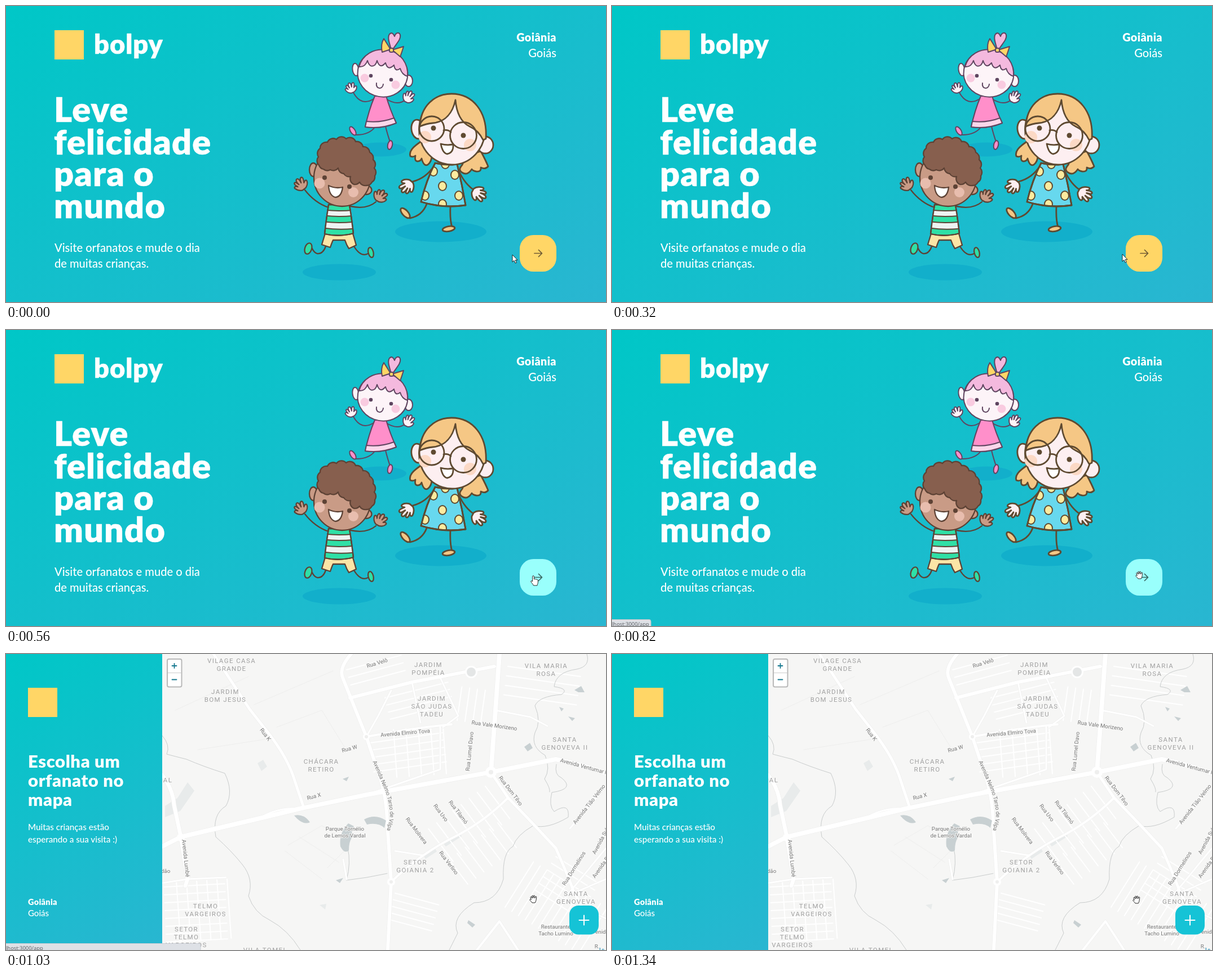
An HTML page that plays this animation: 1064x526 px, repeating every 2.23 s.

```html
<!DOCTYPE html>
<html lang="pt-BR">
<head>
<meta charset="utf-8">
<title>Orfanatos</title>
<style>
html, body { margin: 0; width: 100%; height: 100%; overflow: hidden; }
body { position: relative; background: #14bdd0; }
.layer { position: absolute; left: 0; top: 0; width: 1064px; height: 526px; }
.teal { background: linear-gradient(329.54deg, #29b6d1 0%, #00c7c7 100%); }
#map { background: #ddd; opacity: 0; }
#side { position: absolute; left: 0; top: 0; width: 277px; height: 526px; }
svg { display: block; position: absolute; left: 0; top: 0; }
text { font-family: Lato, sans-serif; fill: #fff; font-weight: 500; }
.black { font-weight: 900; letter-spacing: .02em; }
.round { stroke: #fff; stroke-width: .6; stroke-linejoin: round; }
.line { fill: none; stroke-linecap: round; stroke-linejoin: round; }
.kid { stroke-linecap: round; stroke-linejoin: round; }
.kid .limb, .kid .bare { fill: none; }
.kid .flat { stroke: none; }
#areas text { font: 400 11.5px Roboto, sans-serif; letter-spacing: 1.4px; fill: #a0a0a0; text-anchor: middle; }
#streets text { font: 400 9.8px Roboto, sans-serif; fill: #777; stroke: #f8f8f7; stroke-width: 2px; paint-order: stroke; text-anchor: middle; }
#status text { font: 400 9.4px "Open Sans", sans-serif; fill: #55595e; }
</style>
</head>
<body>
<div id="home" class="layer teal">
<svg width="1064" height="526" viewBox="0 0 1064 526">
  <defs>
    <path id="hand" vector-effect="non-scaling-stroke" d="M-4 10C-9 8-12 3-13-1C-13-4-9-4-7 0C-10-6-9-10-6-9C-4-8-4-4-3-2C-4-8-3-12 0-12C3-12 3-7 2-2C4-8 6-11 9-9C11-7 8-3 6 1C10-2 13-1 12 2C11 6 6 9 3 10Z"/>
    <path id="dress" d="M761 279Q780 284 800 281Q809 318 815 354Q775 360 736 348Q745 310 761 279Z"/>
    <clipPath id="inDress"><use href="#dress"/></clipPath>
    <path id="shirt" d="M572 353H609Q613 378 616 404Q590 411 565 405Q568 378 572 353Z"/>
    <clipPath id="inShirt"><use href="#shirt"/></clipPath>
  </defs>

  <rect x="86" y="43" width="52" height="52" fill="#ffd666"/>
  <text x="156" y="85" font-size="47" class="black round">bolpy</text>
  <g font-size="61" class="round">
    <text class="black" x="85" y="206">Leve</text>
    <text class="black" x="85" y="264">felicidade</text>
    <text class="black" x="85" y="320">para o</text>
    <text class="black" x="85" y="377">mundo</text>
  </g>
  <g font-size="20.1">
    <text x="86" y="437">Visite orfanatos e mude o dia</text>
    <text x="86" y="464.5">de muitas crianças.</text>
  </g>
  <g text-anchor="end">
    <text class="black" x="976" y="63" font-size="19.8">Goiânia</text>
    <text x="976" y="91" font-size="20.2">Goiás</text>
  </g>

  <g fill="#12afcb">
    <ellipse cx="664" cy="255" rx="46" ry="12.5"/>
    <ellipse cx="771" cy="401" rx="81" ry="18.5"/>
    <ellipse cx="591" cy="473" rx="65" ry="14.5"/>
  </g>

  <!-- girl with the bow -->
  <g class="kid" stroke="#5f4560" stroke-width="2" fill="#fdf4f8">
    <path class="limb" d="M652 165Q630 179 616 154M674 165Q694 178 708 167M655 214Q645 229 621 229M673 214Q677 230 681 241"/>
    <use href="#hand" transform="translate(612 146) rotate(-22) scale(.82)"/>
    <use href="#hand" transform="translate(714 162) rotate(25) scale(.82 .98)"/>
    <g fill="#ff8fca">
      <ellipse cx="615" cy="222" rx="4" ry="8.5" transform="rotate(-33 615 222)"/>
      <ellipse cx="681" cy="247" rx="4" ry="8" transform="rotate(12 681 247)"/>
      <path d="M654 160H674Q681 184 692 208Q665 219 637 215Q643 186 654 160Z"/>
    </g>
    <path fill="#fbd7ea" d="M639 205Q664 208 688 199L692 208Q665 219 637 215Z"/>
    <path fill="#f4b9de" d="M683 77C680 66 676 56 680 50C684 46 687 49 689 54C691 47 697 46 699 51C701 59 692 67 686 77Z"/>
    <ellipse cx="620" cy="113" rx="5.5" ry="11" transform="rotate(-8 620 113)"/>
    <ellipse cx="714" cy="133" rx="7" ry="10"/>
    <ellipse cx="668" cy="120" rx="44.5" ry="41.5" transform="rotate(10 668 120)"/>
    <path fill="#f4b9de" d="M626 108Q637 109 641 97Q645 111 654 105Q657 102 658 97Q663 113 673 101Q677 116 688 105Q690 118 699 111Q702 122 712 125C714 103 700 82 677 78C652 74 632 87 626 108Z"/>
    <g fill="#ffd666">
      <path d="M682 77L670 58Q664 68 667 82Z"/>
      <path d="M685 78L705 72Q702 82 699 90Z"/>
      <rect x="680" y="75" width="7" height="7" rx="2.5"/>
    </g>
    <g class="flat" fill="#f9cbe0"><circle cx="636" cy="128" r="7.5"/><circle cx="691" cy="140" r="7.5"/></g>
    <g class="flat" fill="#5f4560"><circle cx="647" cy="124" r="3.3"/><circle cx="683" cy="131" r="3.3"/></g>
    <path class="bare" d="M657 137C655 148 668 149 669 139"/>
  </g>

  <!-- girl with glasses -->
  <g class="kid" stroke="#5e4a31" stroke-width="2.8" fill="#fdeff1">
    <path class="limb" d="M759 284Q745 306 721 312M800 287Q811 313 827 325M746 352Q738 373 716 377M788 357Q787 380 791 393"/>
    <use href="#hand" transform="translate(711 320) rotate(-140) scale(1.05 1.15)"/>
    <use href="#hand" transform="translate(838 334) rotate(118) scale(1.05 1.2)"/>
    <g fill="#f5c785">
      <ellipse cx="708" cy="368" rx="5" ry="11" transform="rotate(-42 708 368)"/>
      <ellipse cx="785" cy="396" rx="11" ry="4.5" transform="rotate(-10 785 396)"/>
      <path d="M737 240C722 250 714 258 717 267Q722 269 726 266Q724 276 730 276Q735 276 737 271Q741 286 748 282Q756 276 755 262Z"/>
      <path d="M842 258Q851 275 855 285Q850 291 842 287Q843 295 834 294Q828 293 826 290Q818 302 809 296Q802 292 807 285Q812 280 812 268Z"/>
    </g>
    <use href="#dress" fill="#67d8ee"/>
    <g clip-path="url(#inDress)" fill="#fdeb9f" stroke-width="2" id="dots"></g>
    <use href="#dress" fill="none"/>
    <ellipse cx="730" cy="219" rx="11" ry="17" transform="rotate(-8 730 219)"/>
    <ellipse cx="850" cy="247" rx="14" ry="15"/>
    <ellipse cx="791" cy="220" rx="58.5" ry="62"/>
    <path fill="#f5c785" d="M734 214C735 178 760 156 790 156C828 156 854 188 851 236L846 238Q838 221 822 214Q800 203 797 167C792 190 779 206 757 208Q745 209 734 214Z"/>
    <g class="flat" fill="#fcd9c5"><circle cx="743" cy="233" r="11"/><circle cx="823" cy="247" r="11"/></g>
    <g class="flat" fill="#5e4a31"><circle cx="758" cy="217" r="4.5"/><circle cx="811" cy="230" r="4.5"/></g>
    <g fill="none"><circle cx="755" cy="218" r="22"/><circle cx="811" cy="230" r="23.5"/></g>
    <path class="bare" d="M776 221Q783 219 789 224"/>
    <path fill="#fff" d="M771 245Q781 248 793 246Q794 261 782 263Q774 261 771 245Z"/>
  </g>

  <!-- boy -->
  <g class="kid" stroke="#5d4235" stroke-width="2.3" fill="#c99b86">
    <path class="limb" d="M572 358Q548 350 530 327M611 356Q640 362 656 348M567 427Q562 441 552 440Q546 438 543 431M617 427Q629 447 642 440"/>
    <use href="#hand" transform="translate(523 317) rotate(-38)"/>
    <use href="#hand" transform="translate(664 338) rotate(30)"/>
    <g fill="#2fe0a6">
      <ellipse cx="536" cy="431" rx="6" ry="10" transform="rotate(18 536 431)"/>
      <ellipse cx="647" cy="438" rx="4.5" ry="9" transform="rotate(-14 647 438)"/>
    </g>
    <path fill="#fce5a6" d="M566 404L560 424L575 429Q578 420 580 416H601Q604 425 608 431L621 425L615 404Z"/>
    <use href="#shirt" fill="#2fe0a6"/>
    <path clip-path="url(#inShirt)" fill="#eef3f2" stroke-width="2" d="M560 362Q590 366 622 362V372Q590 376 560 372ZM560 383Q590 387 622 383V395Q590 399 560 394Z"/>
    <use href="#shirt" fill="none"/>
    <ellipse cx="545" cy="291" rx="7" ry="12"/>
    <ellipse cx="639" cy="327" rx="9.5" ry="8"/>
    <ellipse cx="596" cy="305" rx="50" ry="51"/>
    <path id="curls" fill="#875f4e"/>
    <g class="flat" fill="#e8bdae"><circle cx="556" cy="315" r="9.5"/><circle cx="616" cy="331" r="9"/></g>
    <g class="flat" fill="#5d4235"><circle cx="565" cy="305" r="4"/><circle cx="609" cy="321" r="4"/></g>
    <path fill="#fff" d="M572 319Q584 325 597 322Q595 339 584 340Q573 337 572 319Z"/>
  </g>

  <rect id="go" x="911" y="407" width="65" height="65" rx="24.4" fill="#ffd666"/>
  <path id="arrow" class="line" stroke="#6f5a34" stroke-width="1.7" d="M937 439.5H950.5M944.5 433.5L950.5 439.5L944.5 445.5"/>
</svg>
</div>

<div id="map" class="layer">
<svg width="1064" height="526" viewBox="0 0 1064 526">
  <g id="tiles">
    <rect x="277" width="787" height="526" fill="#f6f6f5"/>
    <g fill="#e8ebeb">
      <path d="M304 256L322 228L334 243L309 279L282 290V270ZM446 194L456 188L463 200L453 208ZM775 336L805 317L808 324L780 342ZM740 358L760 344L764 351L744 364ZM556 446L568 444L566 454Z"/>
    </g>
    <path class="line" stroke="#eeeeed" d="M300 100L430 40M340 170L470 150M440 90L580 30M500 340L560 305L600 330M495 350L560 400M520 325L590 370M480 130L560 100L600 165M570 380L600 350"/>
    <g id="hatches" class="line" stroke="#fff" stroke-width="2"></g>
    <path class="line" stroke="#c9cccc" d="M277 145Q292 162 285 178Q300 182 320 187Q350 200 388 212Q404 245 390 270Q365 285 372 325Q400 350 419 374Q440 400 430 430Q440 460 468 473Q500 490 522 526M1030 0Q1037 22 1012 27Q975 32 972 58Q1000 62 985 72Q945 75 938 92Q950 120 938 140Q930 165 956 180Q966 205 955 222Q966 240 964 245M976 196Q972 215 985 220Q1010 240 968 246Q962 270 972 280Q1000 262 997 290Q960 312 935 305Q905 322 899 342Q880 352 882 400Q870 442 830 442Q788 468 801 496L786 526M606 345Q612 370 604 402M604 402Q640 398 676 390"/>
    <g id="roads" class="line"></g>
    <g fill="#c8d0d2">
      <path d="M607 301Q590 318 593 342Q600 356 608 349Q608 334 613 327Q612 315 617 306ZM635 294Q655 283 674 296L671 309Q660 299 640 303ZM511 287Q528 283 539 299Q526 305 511 287ZM919 165L929 158L934 167L925 173ZM820 473L832 481L827 486L818 478ZM1008 64L1020 57L1026 68L1015 68ZM981 94L989 97L985 102ZM997 111L1009 114L1004 119ZM585 402L598 398L592 407ZM597 222L608 218L604 226Z"/>
    </g>
    <g fill="#fff"><circle cx="639" cy="147" r="6"/><circle cx="310" cy="326" r="7"/><circle cx="683" cy="405" r="7"/><circle cx="860" cy="210" r="10"/><circle cx="825" cy="32" r="11"/></g>
    <circle cx="825" cy="32" r="8" fill="#e4e6e6"/>
    <g fill="#efefee"><circle cx="639" cy="147" r="3"/><circle cx="860" cy="210" r="4"/><circle cx="683" cy="405" r="3"/></g>
  </g>
  <g id="labels">
    <path id="bend" fill="none" d="M653 190L672 235Q684 262 684 290L675 330"/>
    <g id="areas"></g>
    <g id="streets"><text style="text-anchor:start" dy="3"><textPath href="#bend">Avenida Nelmo Tarso de Vilpa</textPath></text></g>
  </g>
  <rect x="286" y="9" width="25.5" height="49.5" rx="3" fill="#fff" stroke="#b9b9b9" stroke-width="2"/>
  <path d="M287 33.5H311" stroke="#ccc"/>
  <path class="line" stroke="#16788f" stroke-width="1.8" d="M294.5 21H302.5M298.5 17V25M294.5 45.5H302.5"/>
  <text x="1052" y="529" font-size="9" style="fill:#0078a8">Le</text>
  <rect x="999" y="447" width="52" height="51.5" rx="16" fill="#15c3d6"/>
  <path class="line" stroke="#fff" stroke-width="2" d="M1016.5 473H1033.5M1025 464.5V481.5"/>
</svg>
<div id="side" class="teal">
<svg width="277" height="526" viewBox="0 0 277 526">
  <rect x="39" y="60" width="52" height="52" fill="#ffd666"/>
  <g font-size="31">
    <text class="black" x="39" y="202">Escolha um</text>
    <text class="black" x="39" y="236">orfanato no</text>
    <text class="black" x="39" y="270">mapa</text>
  </g>
  <g font-size="15.2">
    <text x="39" y="313">Muitas crianças estão</text>
    <text x="39" y="335">esperando a sua visita :)</text>
  </g>
  <text class="black" x="39" y="446" font-size="14.5">Goiânia</text>
  <text x="39" y="465.5" font-size="15">Goiás</text>
</svg>
</div>
</div>

<svg width="1064" height="526" viewBox="0 0 1064 526">
  <g id="status" opacity="0">
    <path id="short" fill="#dee1e6" stroke="#bfc3c8" d="M-1 514.5H66Q69 514.5 69 518V527H-1Z"/>
    <path id="wide" opacity="0" fill="#dee1e6" stroke="#c9cdd4" d="M-1 514.5H342Q345 514.5 345 518V527H-1Z"/>
    <text x="0" y="525.5">lhost:3000/app</text>
  </g>
  <g id="cursor" fill="#fff" stroke="#111" stroke-width=".9" stroke-linejoin="round">
    <path id="point" d="M0 0V13L3 10.2L5.2 15L7.4 14L5.2 9.4H9Z"/>
    <path id="press" opacity="0" d="M3.6 11V2.2a1.4 1.4 0 0 1 2.8 0V7c.6-.9 2.3-.8 2.6.2 .7-.7 2.2-.5 2.4.5 .8-.5 2 0 2 1.2V12c0 3-1.2 3.6-1.4 6H5.4C4.6 15.6 2.6 14 1 11.5C.2 10.2 1.8 9 2.8 10.2Z"/>
    <path id="grab" opacity="0" d="M3.4 8.5L2 4.8a1 1 0 0 1 1.9-.8L5 6L4.6 2.4a1 1 0 0 1 2-.2L7 5.5L7.6 2a1 1 0 0 1 2 .2V6L10.8 3.4a1 1 0 0 1 1.9.6L12 9.5Q11.6 12 10.3 14H5Q4 12.5 1 9.4C.3 8.2 1.8 7.2 3.4 8.5Z"/>
  </g>
</svg>

<script>
const LOOP = 2230;
const $ = id => document.getElementById(id);
const add = (id, html) => $(id).insertAdjacentHTML('beforeend', html);

// Clockwise chain of outward bumps
const bumps = (r, [first, ...rest]) =>
  `M${first}` + [...rest, first].map(p => `A${r} ${r} 0 0 1 ${p}`).join('') + 'Z';

$('curls').setAttribute('d', bumps(11, [
  '555 283', '554 268', '557 253', '570 242', '586 237', '603 236', '620 241', '633 250',
  '645 260', '651 273', '653 288', '654 302', '649 313', '639 319', '627 313', '617 317',
  '611 303', '599 298', '589 288', '575 291', '563 290'
]));

add('dots', [[758, 294], [796, 300], [774, 320], [743, 337], [803, 337], [774, 352], [779, 281]]
  .map(([x, y]) => `<ellipse cx="${x}" cy="${y}" rx="7" ry="8"/>`).join(''));

// Blocks of parallel side streets: x, y, angle, length, gap, count
const hatch = (x, y, deg, len, gap, n) =>
  add('hatches', `<path transform="translate(${x} ${y}) rotate(${deg})" d="M0 0${`h${len}m${-len} ${gap}`.repeat(n)}"/>`);
hatch(645, 158, -8, 130, 13, 5);
hatch(775, 128, 86, 85, 22, 5);
hatch(672, 78, -14, 115, 13, 4);
hatch(604, 28, -15, 100, 14, 3);
hatch(850, 235, 53, 72, 18, 8);
hatch(872, 300, 53, 55, 18, 7);
hatch(690, 425, 15, 80, 12, 5);
hatch(280, 414, -3, 108, 14, 8);
hatch(392, 400, 86, 105, 18, 6);
hatch(890, 22, 8, 130, 17, 4);
hatch(800, 118, -82, 60, 14, 4);
hatch(885, 450, -58, 95, 14, 12);
hatch(975, 360, 32, 90, 14, 6);

// Main streets: width, path
const roads = [
  [3, 'M683 65L660 110L639 147M720 50L735 122M770 42L802 110L775 130M322 400L390 397M277 407L322 400M450 292Q480 272 522 275M640 250L770 205V130M604 400L598 365'],
  [3, 'M1064 235L1000 310M1064 345L990 435M1006 425L1064 400M1064 470L1020 450M868 100L930 112L960 128M690 350L740 358'],
  [4, 'M890 256Q845 300 795 325Q735 355 683 405M875 475L835 526M875 475L908 526M639 147Q720 132 790 125'],
  [5, 'M368 0L432 98L465 140Q500 185 512 225L527 270M860 210L890 255L935 302L975 345Q995 390 1008 425L1022 450'],
  [6, 'M612 0Q590 25 597 42L639 147L665 225Q675 260 676 300L683 405L677 526M610 78L720 50L866 22'],
  [7, 'M277 215Q296 240 298 268L310 325L322 400L318 412'],
  [8, 'M277 342L310 325L450 292L520 275L640 250L860 210L975 187Q1020 196 1064 212M875 0L868 100L860 210']
];
const strokes = (color, extra) => add('roads', roads
  .map(([w, d]) => `<path stroke="${color}" stroke-width="${w + extra}" d="${d}"/>`).join(''));
strokes('#ededec', 1.2);
strokes('#fff', 0);

const area = (x, y, ...lines) => lines.forEach((s, i) =>
  add('areas', `<text x="${x}" y="${y + i * 13.8}">${s}</text>`));
area(400, 16, 'VILAGE CASA', 'GRANDE');
area(389, 71, 'JARDIM', 'BOM JESUS');
area(749, 23, 'JARDIM', 'POMPÉIA');
area(755, 83, 'JARDIM', 'SÃO JUDAS', 'TADEU');
area(958, 25, 'VILA MARIA', 'ROSA');
area(991, 156, 'SANTA', 'GENOVEVA II');
area(559, 195, 'CHÁCARA', 'RETIRO');
area(726, 374, 'SETOR', 'GOIANIA 2');
area(354, 452, 'TELMO', 'VARGEIROS');
area(320, 493, 'SETOR', 'TELMO', 'VARGEIROS');
area(460, 530, 'VILA TOMEL');
area(1011, 430, 'SANTA', 'GENOVEVA');
area(287, 228, 'AL');

const street = (x, y, deg, s) =>
  add('streets', `<text transform="translate(${x} ${y}) rotate(${deg})" dy="3.4">${s}</text>`);
street(658, 16, -17, 'Rua Velô');
street(708, 140, -5, 'Avenida Elmiro Tova');
street(866, 127, 8, 'Rua Vale Morizeno');
street(822, 173, -84, 'Rua Lumel Davo');
street(460, 143, 53, 'Rua K');
street(609, 168, -15, 'Rua W');
street(546, 253, -15, 'Rua X');
street(1026, 200, 15, 'Avenida Ventumar N');
street(895, 243, 53, 'Rua Dom Tilvo');
street(319, 363, 84, 'Avenida Lumbé');
street(728, 314, 53, 'Rua Molivera');
street(771, 282, 53, 'Rua Uvo');
street(802, 281, 53, 'Rua Tilamó');
street(785, 371, 53, 'Rua Verlino');
street(1007, 381, -58, 'Rua Dormelinos');
street(1034, 267, -52, 'Avenida Tião Velmo');
street(1058, 325, -62, 'Avenida Sulmar');
street(1062, 368, -55, 'Avenida Brolena');
street(601, 311, 0, 'Parque Tornélio');
street(601, 323, 0, 'de Lemos Vardal');
street(975, 485, 0, 'Restaurante');
street(975, 497, 0, 'Tacho Lumino');
street(1057, 494, 0, 'enida');
street(283, 386, 0, 'dão');
street(1048, 520, 0, 'R.');

// Each row holds its value until the next one
const hold = (id, prop, rows) => $(id).animate(
  [...rows, [LOOP, rows.at(-1)[1]]].map(([t, v]) => ({ offset: t / LOOP, [prop]: v, easing: 'step-end' })),
  { duration: LOOP, iterations: Infinity });

hold('cursor', 'transform', [
  [0, 898, 442], [70, 901, 442], [160, 903, 442], [320, 905, 441], [410, 914, 438], [480, 923, 437],
  [560, 930, 436], [640, 930, 435], [730, 930, 432], [820, 928, 428], [1260, 925, 428], [1340, 923, 429]
].map(([t, x, y]) => [t, `translate(${x}px, ${y}px)`]));
hold('point', 'opacity', [[0, 1], [410, 0]]);
hold('press', 'opacity', [[0, 0], [410, 1], [820, 0]]);
hold('grab', 'opacity', [[0, 0], [820, 1]]);

hold('go', 'fill', [[0, '#ffd666'], [410, '#eade84'], [480, '#b4f5d8'], [560, '#99fffc']]);
hold('arrow', 'stroke', [[0, '#6f5a34'], [410, '#655c3c'], [480, '#4a6250'], [560, '#3a6660']]);

hold('status', 'opacity', [[0, 0], [730, 1], [1110, .5], [1190, 0]]);
hold('short', 'opacity', [[0, 1], [870, 0]]);
hold('wide', 'opacity', [[0, 0], [870, 1]]);

hold('map', 'opacity', [[0, 0], [870, 1]]);
hold('tiles', 'opacity', [[0, .2], [870, .2], [950, .65], [1030, 1]]);
hold('labels', 'opacity', [[0, .4], [870, .4], [950, .7], [1030, 1]]);
</script>
</body>
</html>
```
